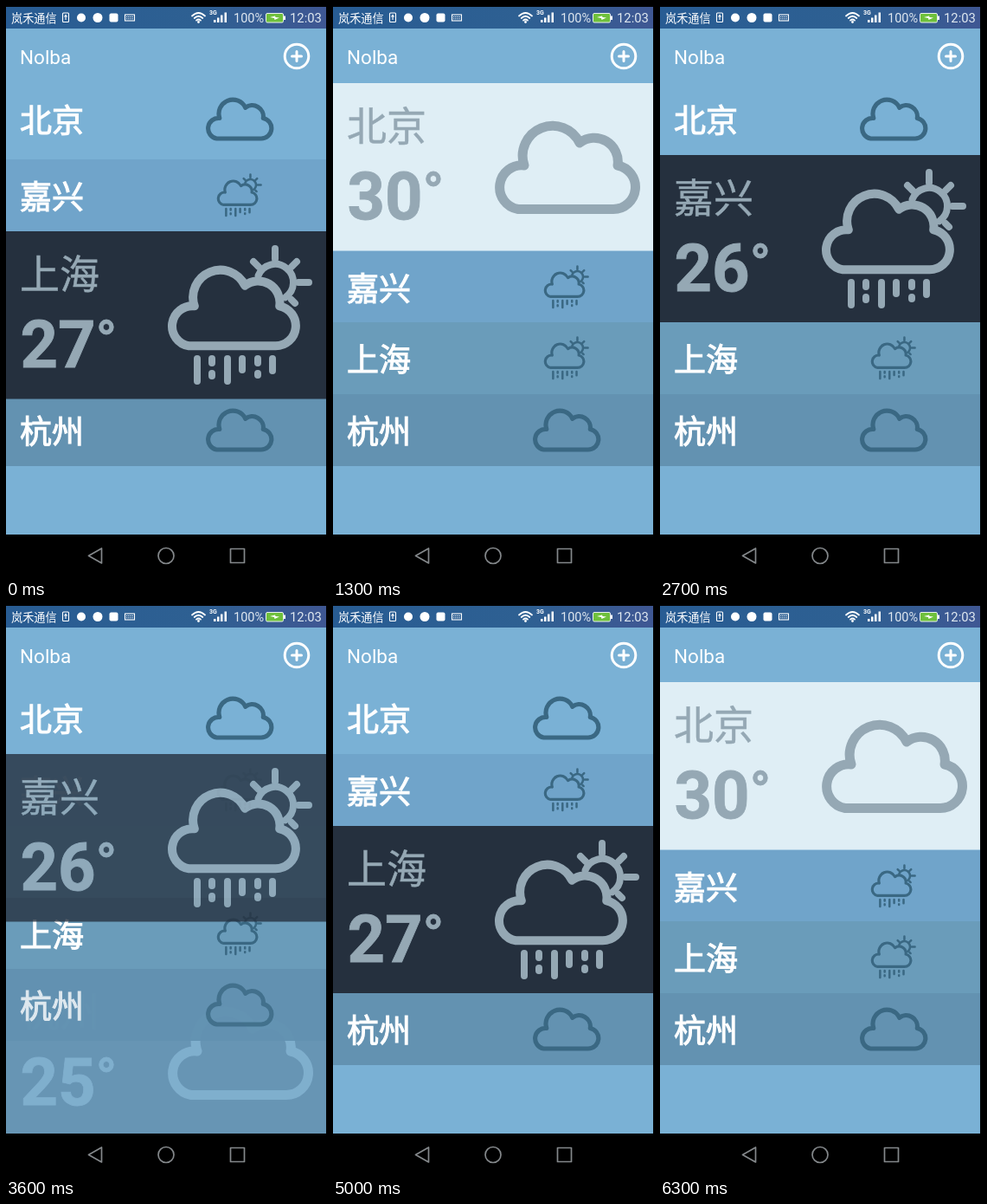
Animation, 371 px wide and 659 px high, one loop 6400 ms. Source, as an HTML page:

```html
<!DOCTYPE html>
<html lang="zh-CN">
<head>
<meta charset="utf-8">
<title>Weather list</title>
<style>
html, body { margin: 0; width: 100%; height: 100%; overflow: hidden; background: #000; }
svg { display: block; width: 371px; height: 659px; }
text { font-family: Roboto, "Noto Sans CJK SC", "Noto Sans CJK", sans-serif; }
.city { font: 400 37px "Noto Sans CJK SC", "Noto Sans CJK", sans-serif; fill: #fff; stroke: #fff; stroke-width: 1.1; }
.big { font: 400 46px "Noto Sans CJK SC", "Noto Sans CJK", sans-serif; fill: #95a8b4; stroke: #95a8b4; stroke-width: .5; }
.temp { font: 700 76px Roboto, sans-serif; fill: #95a8b4; stroke: #95a8b4; stroke-width: .8; }
.deg { font-size: 63px; }
.line { fill: none; stroke-linecap: round; stroke-linejoin: round; }
</style>
</head>
<body>
<svg viewBox="0 0 371 659">
  <defs>
    <linearGradient id="bar">
      <stop offset="0" stop-color="#285c93"/>
      <stop offset=".6" stop-color="#2e6092"/>
      <stop offset="1" stop-color="#3f5793"/>
    </linearGradient>
    <clipPath id="app"><rect y="26" width="371" height="584"/></clipPath>
    <g id="cloud" class="line" stroke-width="11">
      <path d="M214 145.5A25.5 25.5 0 0 1 221 95A34.6 34.6 0 0 1 285 69A27.5 27.5 0 0 1 329 95A25.5 25.5 0 0 1 324 145.5Z"/>
    </g>
    <g id="rain" class="line" stroke-width="8">
      <use href="#cloud" transform="translate(16.5 -.2) scale(.911)"/>
      <path d="M291.600 51A21 21 0 1 1 323 76.200"/>
      <path d="M311 20V32M338 59H350M286 35L292 41M330 41L336 35M330 79L334 83"/>
      <path d="M221 147V173M238 147V152M238 164V167M256 147V173M273 147V160M291 147V152M291 164V166M308 147V161"/>
    </g>
  </defs>

  <rect width="371" height="659" fill="#7ab1d5"/>
  <rect width="371" height="26" fill="url(#bar)"/>

  <g id="status" fill="#fff">
    <text x="6" y="19" font-size="13.2">岚禾通信</text>
    <g fill="none" stroke="#fff" stroke-width="1.1">
      <rect x="65.500" y="8" width="7" height="10.500" rx="1"/>
      <path d="M69 10.500V16M67.500 12.500L69 10.500L70.500 12.500"/>
      <rect x="137.500" y="10" width="11" height="7"/>
      <path d="M139 12.500H147.500M139 14.800H147.500" stroke-dasharray="1.2 1"/>
    </g>
    <circle cx="87" cy="13.500" r="5"/>
    <circle cx="106" cy="13.500" r="5.500"/>
    <rect x="119.500" y="8.500" width="10" height="10" rx="2"/>
    <g class="line" stroke="#fff" stroke-width="1.8">
      <path d="M215 11.500Q222.500 4.500 230 11.500M217.700 14Q222.500 9.500 227.300 14M220 16.600Q222.500 14.300 225 16.600"/>
    </g>
    <circle cx="222.500" cy="18.500" r="1.400"/>
    <text x="235" y="10" font-size="7" font-weight="700">3G</text>
    <path d="M240 16h2.500v3h-2.500zM244 13.500h2.500v5.500h-2.500zM248 10.500h2.500v8.500h-2.500zM252.500 7.500h2.500v11.500h-2.500z"/>
    <text x="263" y="19" font-size="14.500" fill="#dfe8f0">100%</text>
    <rect x="300.500" y="8.500" width="20" height="10.500" rx="1.500" fill="#6fc03c" stroke="#e8f0f0"/>
    <rect x="321" y="11.500" width="2" height="4.500"/>
    <path d="M305 13L311 11.500L311.500 13L316 13.500L310.500 16L310 14Z"/>
    <text x="328" y="19" font-size="14.800" fill="#dfe8f0">12:03</text>
  </g>

  <text x="16" y="67" font-size="22.500" fill="#fff">Nolba</text>
  <g class="line" stroke="#fff" stroke-width="3">
    <circle cx="336" cy="58" r="13.800"/>
    <path d="M330.500 58H341.500M336 52.500V63.500"/>
  </g>

  <g id="list" clip-path="url(#app)"></g>

  <path d="M0 610H371V659H0ZM0 0H371V659H370V1H0Z" fill="#000"/>
  <g fill="none" stroke="#84888b" stroke-width="1.700" stroke-linejoin="round">
    <path d="M95.500 634.500L110.500 626V643Z"/>
    <circle cx="185" cy="634.500" r="9"/>
    <rect x="259.500" y="626.500" width="16" height="16"/>
  </g>
</svg>

<script>
const TOP = 89, ROW = 82.75, OPEN = 193.5, LOOP = 6400, TICK = 100;
const DARK = '#25303e', LIGHT = '#dfeef5';

const cities = [
  { name: '北京', temp: 30, icon: 'cloud', row: '#7ab1d5', panel: LIGHT },
  { name: '嘉兴', temp: 26, icon: 'rain', row: '#70a4ca', panel: DARK },
  { name: '上海', temp: 27, icon: 'rain', row: '#6a9cba', panel: DARK },
  { name: '杭州', temp: 25, icon: 'cloud', row: '#6392b1', panel: DARK }
];

// start time, closing city, opening city
const moves = [[-100, 2, 0], [1700, 0, 1], [3400, 1, 3], [4500, 3, 2], [5900, 2, 0]];
const ease = [0.01, 0.05, 0.25, 0.68, 1];

const list = document.getElementById('list');

function group(html) {
  const g = document.createElementNS('http://www.w3.org/2000/svg', 'g');
  g.innerHTML = html;
  return list.appendChild(g);
}

function addPanel(c) {
  return group(`<rect width="371" height="${OPEN}" fill="${c.panel}"/>
    <text class="big" x="16" y="66.3">${c.name}</text>
    <text class="temp" x="16.5" y="157">${c.temp}<tspan class="deg" dy="-9.5">°</tspan></text>
    <use href="#${c.icon}" stroke="#95a8b4"/>`);
}

function addBack(c) {
  return group(`<rect width="371" height="${Math.ceil(ROW)}" fill="${c.row}"/>`);
}

function addLabel(c) {
  const scale = c.icon === 'rain' ? 0.312 : 0.467;
  return group(`<text class="city" x="16" y="57.2">${c.name}</text>
    <use href="#${c.icon}" stroke="#3a6883"
      transform="translate(269.5 41.4) scale(${scale}) translate(-269.5 -97)"/>`);
}

// The opening panel lies under its row; the closing one lies over the list.
for (const c of cities) {
  c.under = addPanel(c);
  c.back = addBack(c);
  c.label = addLabel(c);
}
for (const c of cities) c.over = addPanel(c);

function place(g, y, alpha) {
  g.setAttribute('transform', `translate(0 ${Math.round(y)})`);
  g.setAttribute('opacity', alpha);
  g.setAttribute('display', alpha > 0 ? 'inline' : 'none');
}

function render(time) {
  const t = time % LOOP;
  const [start, from, to] = moves.filter(m => m[0] <= t).pop();
  const step = Math.floor((t - start) / TICK);
  const p = ease[Math.min(step, ease.length - 1)];
  const fade = Math.max(0, (p - 0.05) / 0.95);
  const share = (i, v) => i === to ? v : i === from ? 1 - v : 0;
  let y = TOP;
  cities.forEach((c, i) => {
    const shown = share(i, fade);
    place(c.under, y, i === to ? shown : 0);
    place(c.back, y, 1 - shown * shown);
    place(c.label, y, 1 - shown);
    place(c.over, y, i === from ? shown : 0);
    y += ROW + (OPEN - ROW) * share(i, p);
  });
}

const begin = performance.now();
function frame() {
  render(performance.now() - begin);
  requestAnimationFrame(frame);
}
frame();
</script>
</body>
</html>
```
